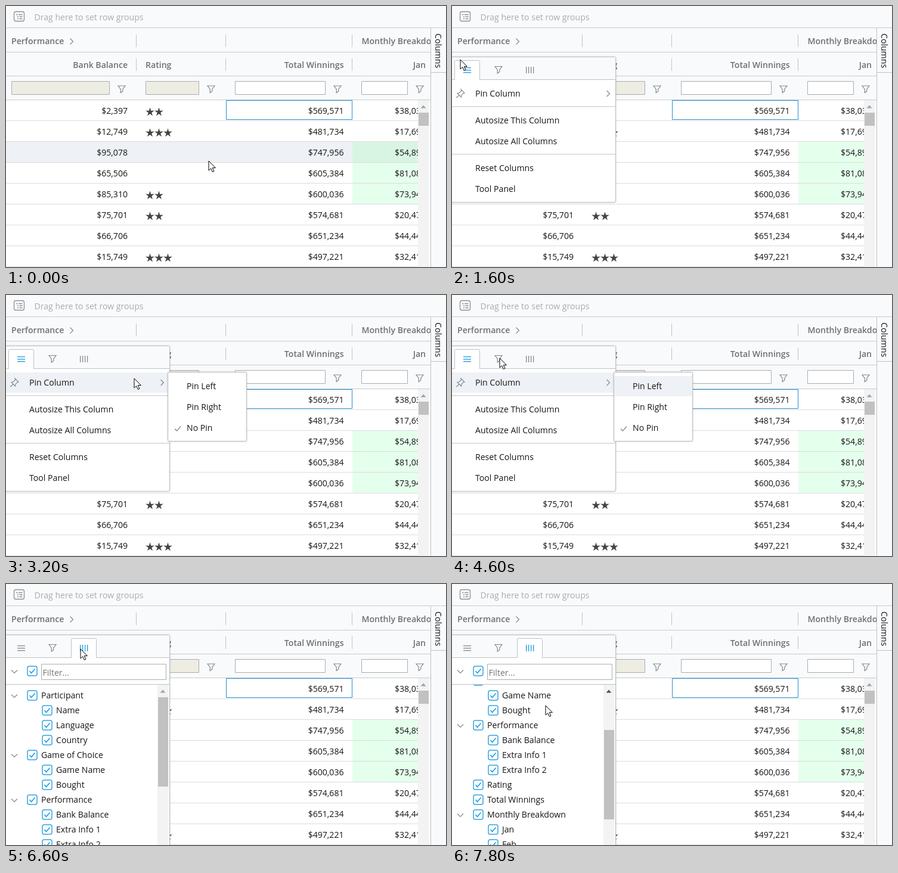
These frames come from a looping animation (738x438 px, 8000 ms). An HTML page with a canvas:

```html
<!DOCTYPE html>
<html lang="en">
<head>
<meta charset="utf-8">
<title>Grid column menu</title>
<style>
  html, body { margin: 0; width: 100%; height: 100%; overflow: hidden; background: #fff; }
  canvas { display: block; }
</style>
</head>
<body>
<canvas id="stage" width="738" height="438"></canvas>
<script>
const ctx = document.getElementById('stage').getContext('2d');
const LOOP = 8000, STEP = 200;
const INK = '#151515', GREY = '#6d7073', ICON = '#7f8a90', BLUE = '#1a9bdc';
const PANEL = '#f9fafc', BORDER = '#bdc3c7', LINE = '#d9dcde', HOVER = '#eef1f5';

const ROWS = [
  ['$2,397', 2, '$569,571', '$38,031'],
  ['$12,749', 3, '$481,734', '$17,697'],
  ['$95,078', 0, '$747,956', '$54,890'],
  ['$65,506', 0, '$605,384', '$81,086'],
  ['$85,310', 2, '$600,036', '$73,948'],
  ['$75,701', 2, '$574,681', '$20,472'],
  ['$66,706', 0, '$651,234', '$44,446'],
  ['$15,749', 3, '$497,221', '$32,417'],
];

// A leading ">" marks a group, "-" marks a child.
const COLUMNS = ['>Participant', '-Name', '-Language', '-Country', '>Game of Choice', '-Game Name',
  '-Bought', '>Performance', '-Bank Balance', '-Extra Info 1', '-Extra Info 2', ' Rating',
  ' Total Winnings', '>Monthly Breakdown', '-Jan', '-Feb', '-Mar'];

// time, x, y of the pointer tip
const POINTER = [[0, 340, 260], [1200, 14, 90], [1600, 14, 90], [2000, 215, 140], [3200, 215, 140],
  [3600, 305, 155], [4000, 305, 155], [4400, 80, 106], [5200, 80, 106], [5600, 70, 178],
  [5800, 70, 178], [6400, 125, 109], [6800, 125, 109], [7400, 157, 204]];

const ease = p => p * p * (3 - 2 * p);
const progress = (t, from, to) => ease(Math.min(1, Math.max(0, (t - from) / (to - from))));

function pointerAt(t) {
  const next = POINTER.findIndex(key => key[0] > t);
  if (next < 0) return POINTER[POINTER.length - 1].slice(1);
  const [t0, x0, y0] = POINTER[next - 1], [t1, x1, y1] = POINTER[next];
  const p = progress(t, t0, t1);
  return [Math.round(x0 + (x1 - x0) * p), Math.round(y0 + (y1 - y0) * p)];
}

function text(value, x, baseline, color = INK, { align = 'left', weight = 400 } = {}) {
  ctx.font = `${weight} 14.1px "Open Sans", "Noto Sans", sans-serif`;
  ctx.textAlign = align;
  ctx.fillStyle = color;
  ctx.fillText(value, x, baseline);
}

function fill(x, y, w, h, color) {
  ctx.fillStyle = color;
  ctx.fillRect(x, y, w, h);
}

function box(x, y, w, h, stroke, background, radius = 0, width = 1) {
  ctx.beginPath();
  ctx.roundRect(x + .5, y + .5, w - 1, h - 1, radius);
  if (background) { ctx.fillStyle = background; ctx.fill(); }
  ctx.strokeStyle = stroke;
  ctx.lineWidth = width;
  ctx.stroke();
}

function path(x, y, d, stroke, width = 1.2, background) {
  const shape = new Path2D(d);
  ctx.save();
  ctx.translate(x, y);
  if (background) { ctx.fillStyle = background; ctx.fill(shape); }
  ctx.strokeStyle = stroke;
  ctx.lineWidth = width;
  ctx.stroke(shape);
  ctx.restore();
}

function clipped(x, y, w, h, draw) {
  ctx.save();
  ctx.beginPath();
  ctx.rect(x, y, w, h);
  ctx.clip();
  draw();
  ctx.restore();
}

const funnel = (x, y, color = ICON) => path(x, y, 'M-6 -5.5H6L1.8 0V3.4L-1.8 6V0Z', color, 1.2);
const burger = (x, y, color = ICON) => [-4, 0, 4].forEach(dy => fill(x - 6, y + dy, 13, 1.3, color));
const bars = (x, y, color = ICON) => [-6, -2, 2, 6].forEach(dx => fill(x + dx, y - 5, 1.3, 11, color));
const chevronRight = (x, y) => path(x, y, 'M-2.5 -5L2.5 0L-2.5 5', ICON);
const chevronDown = (x, y) => path(x, y, 'M-5 -2.5L0 2.5L5 -2.5', ICON);

function star(cx, cy) {
  ctx.beginPath();
  for (let i = 0; i < 10; i++) {
    const r = i % 2 ? 2.9 : 7.7, a = i * Math.PI / 5;
    ctx.lineTo(cx + r * Math.sin(a), cy - r * Math.cos(a));
  }
  ctx.fillStyle = '#444';
  ctx.fill();
}

function checkbox(cx, cy) {
  box(cx - 8.5, cy - 8.5, 17, 17, '#35a4e0', '#fff', 3, 1.5);
  path(cx, cy, 'M-4.5 0L-1.5 3.5L4.5 -3.5', BLUE, 1.6);
}

function scrollbar(x, top, thumbTop, thumbHeight, arrowColor) {
  fill(x, top, 18, 438 - top, '#f2f3f2');
  fill(x + 1, thumbTop, 17, thumbHeight, '#c1c1c1');
  path(x + 9, top + 11, 'M-4.5 2.5L0 -2.5L4.5 2.5Z', 'transparent', 0, arrowColor);
}

function drawHeader(showBurger) {
  fill(0, 0, 738, 158, PANEL);
  [36, 77, 117, 157].forEach(y => fill(0, y, y === 36 ? 738 : 712, 1, '#c6cbce'));
  box(13, 9, 18, 17, '#8d9296', null, 3, 1.3);
  path(0, 0, 'M17 14.5H19.5M21 14.5H27.5M19 18H21M22.5 18H27.5M19 21.5H21M22.5 21.5H27.5', '#8d9296', 1.3);
  text('Drag here to set row groups', 47.5, 24, '#a9acae');

  [218, 368, 580].forEach(x => [48, 88].forEach(y => fill(x, y, 1, 21, BORDER)));
  const bold = { weight: 600 }, boldRight = { weight: 600, align: 'right' };
  text('Performance', 9, 64, GREY, bold);
  chevronRight(110, 59.5);
  clipped(581, 37, 131, 40, () => text('Monthly Breakdown', 596.5, 64, GREY, bold));
  text('Bank Balance', 204, 104, GREY, boldRight);
  text('Rating', 234, 104, GREY, bold);
  text('Total Winnings', 566.5, 104, GREY, boldRight);
  text('Jan', 704, 104, GREY, boldRight);
  if (showBurger) burger(18, 98);

  [[9, 165, true], [234, 90, true], [384, 152], [596, 78]].forEach(([x, w, disabled]) =>
    box(x, 126, w, 23, '#a9adaf', disabled ? '#edede4' : '#fff'));
  [194, 344, 556, 694].forEach(x => funnel(x, 139.5));
}

function drawRows(hovered) {
  clipped(0, 158, 692, 280, () => ROWS.forEach(([balance, stars, winnings, jan], i) => {
    const y = 158 + i * 35, green = i >= 2 && i <= 4;
    if (i === hovered) fill(0, y, 692, 34, HOVER);
    if (green) fill(581, y, 111, 34, i === hovered ? '#d8f5e3' : '#e5ffed');
    fill(0, y + 34, 692, 1, LINE);
    text(balance, 204, y + 23, INK, { align: 'right' });
    for (let s = 0; s < stars; s++) star(241.5 + 15 * s, y + 20);
    text(winnings, 566.5, y + 23, INK, { align: 'right' });
    text(jan, 652, y + 23);
  }));
  box(369, 158, 212, 33, '#2290d2');
  scrollbar(691, 158, 179, 22, '#a3a3a3');
}

function drawSidePanel() {
  fill(709, 158, 3, 280, '#fafbfb');
  fill(712, 37, 26, 401, PANEL);
  fill(712, 37, 1, 401, BORDER);
  fill(712, 111, 26, 1, BORDER);
  ctx.save();
  ctx.translate(719.5, 46);
  ctx.rotate(Math.PI / 2);
  text('Columns', 0, 0);
  ctx.restore();
}

function popup(x, y, w, h) {
  ctx.save();
  ctx.shadowColor = 'rgba(0,0,0,.15)';
  ctx.shadowBlur = 3;
  box(x, y, w, h, BORDER, '#fff', 2);
  ctx.restore();
}

function drawTabs(active) {
  fill(0, 86, 274, 38, PANEL);
  fill(0, 123, 274, 1, BORDER);
  const left = [4, 56, 109][active];
  box(left, 91, 43, 36, BORDER, '#fff', 2);
  fill(0, 124, 274, 4, '#fff');
  [burger, funnel, bars].forEach((icon, i) => icon([25, 78, 130][i], 107, i === active ? BLUE : ICON));
}

function drawGeneralTab(t) {
  if (t >= 2000) fill(0, 130, 274, 34, HOVER);
  path(14, 147, 'M1 -7L7 -1L5 -0.5L2 2.5L1.5 6L-5 -0.5L-1.5 -1.5L1.5 -4.5ZM-2 3L-7 7', ICON, 1.1);
  chevronRight(262, 147);
  [['Pin Column', 147], ['Autosize This Column', 192], ['Autosize All Columns', 227],
    ['Reset Columns', 272], ['Tool Panel', 307]].forEach(([label, y]) => text(label, 39, y + 5));
  [168, 248].forEach(y => fill(0, y, 274, 1.5, '#d4d7d9'));
  if (t < 2600) return;
  popup(271, 129, 133, 117);
  if (t >= 3600) fill(272, 136, 131, 34, HOVER);
  ['Pin Left', 'Pin Right', 'No Pin'].forEach((label, i) => text(label, 303, 158 + 35 * i));
  path(288, 224, 'M-5 0.5L-1.5 4L5 -3.5', ICON);
}

function drawFilterTab() {
  text('Example Custom Filter', 4, 150, '#000', { weight: 700 });
  ['No filter', 'Positive', 'Negative', '> £50,000', '> £90,000'].forEach((label, i) => {
    const y = 164 + 31 * i;
    box(16, y - 7, 14, 14, '#9a9a9a', '#e8e8e8', 6.5);
    if (i === 0) box(20, y - 3, 6, 6, '#555', '#555', 2.5);
    text(label, 35, y + 6);
  });
}

function drawColumnsTab(scroll) {
  clipped(0, 169, 274, 269, () => {
    COLUMNS.forEach((entry, i) => {
      const y = 187 + 25 * i - scroll, indent = entry[0] === '-' ? 25 : 0;
      if (entry[0] === '>') chevronDown(14, y + 1);
      checkbox(44 + indent, y);
      text(entry.slice(1), 59 + indent, y + 5);
    });
    scrollbar(254, 169, 190 + scroll * .44, 150, scroll ? '#505050' : '#a3a3a3');
  });
  fill(0, 168, 274, 1, BORDER);
  chevronDown(14, 147);
  checkbox(44, 146);
  box(59, 134, 210, 27, '#a9adaf', '#fff');
  text('Filter...', 61.5, 154, '#757575');
}

function drawMenu(t, tab) {
  popup(-3, 85, 278, [245, 235, 380][tab]);
  drawTabs(tab);
  if (tab === 0) drawGeneralTab(t);
  else if (tab === 1) drawFilterTab();
  else drawColumnsTab(Math.round(125 * progress(t, 7400, 7800)));
}

function render(t) {
  const [x, y] = pointerAt(t);
  const menuOpen = t >= 1400;
  const tab = t < 4800 ? 0 : t < 6600 ? 1 : 2;
  fill(0, 0, 738, 438, '#fff');
  drawHeader(!menuOpen && x < 218 && y > 77 && y < 118);
  drawRows(!menuOpen && y >= 158 ? Math.floor((y - 158) / 35) : -1);
  drawSidePanel();
  if (menuOpen) drawMenu(t, tab);
  path(x, y, 'M0 0V16L3.7 12.6L6.3 18.4L8.9 17.3L6.3 11.6H11.4Z', '#000', 1, '#fff');
}

function frame(now) {
  render(Math.floor(now % LOOP / STEP) * STEP);
  requestAnimationFrame(frame);
}
requestAnimationFrame(frame);
</script>
</body>
</html>
```
